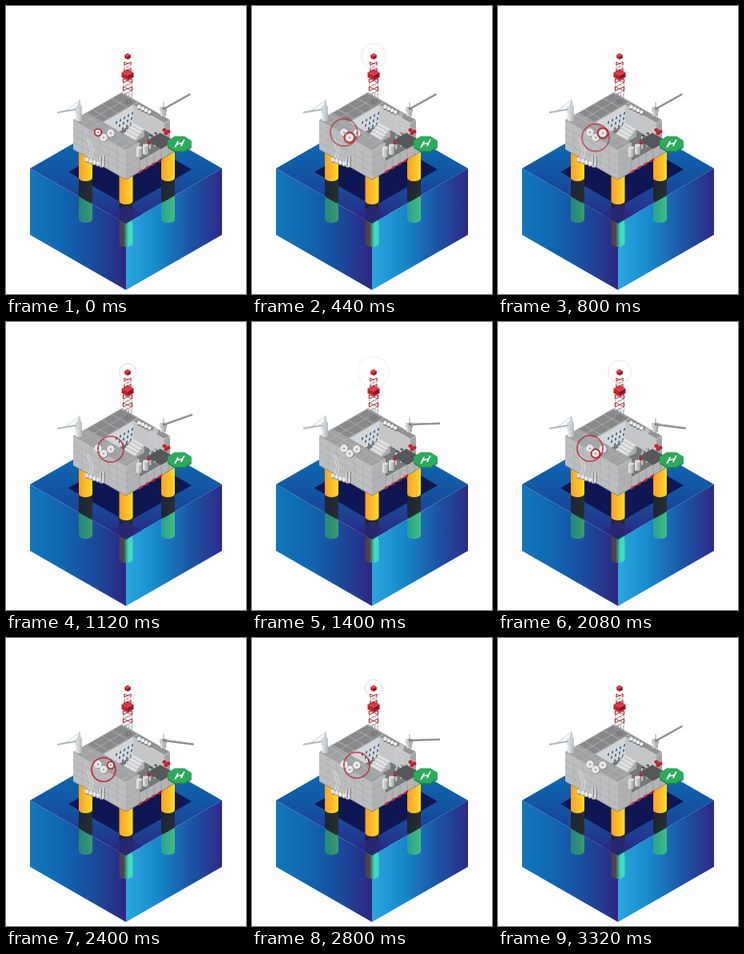
Animation, 300 px wide and 360 px high, one loop 3360 ms. Source, as an HTML page with a canvas:

```html
<!DOCTYPE html>
<html lang="en">
<head>
<meta charset="utf-8">
<title>Offshore platform</title>
<style>
html, body { margin: 0; width: 100%; height: 100%; overflow: hidden; background: #fff; }
canvas { display: block; width: 300px; height: 360px; }
</style>
</head>
<body>
<canvas id="stage" width="300" height="360"></canvas>
<script>
const stage = document.getElementById('stage');
const LOOP = 3360, HALF = LOOP / 2, BEAT = LOOP / 4;
const RED = '#c4202c', DARK_RED = '#8c1a22';
let c = stage.getContext('2d');

const clamp = v => Math.max(0, Math.min(1, v));
const ease = v => v * v * (3 - 2 * v);

// isometric point: a runs back to the right, b back to the left, z up
const iso = base => (a, b, z = 0) => [150 + a - b, base - (a + b) * .575 - z];
const water = iso(272);
const rig = iso(217);

function trace(points) {
  c.beginPath();
  points.forEach(p => c.lineTo(...p));
}
function face(fill, ...points) {
  trace(points);
  c.fillStyle = fill;
  c.fill();
}
function line(color, width, ...points) {
  trace(points);
  c.strokeStyle = color;
  c.lineWidth = width;
  c.stroke();
}
function oval(fill, x, y, rx, ry = rx) {
  c.beginPath();
  c.ellipse(x, y, rx, ry, 0, 0, 7);
  c.fillStyle = fill;
  c.fill();
}
function ring(color, x, y, r, width) {
  c.beginPath();
  c.arc(x, y, r, 0, 7);
  c.strokeStyle = color;
  c.lineWidth = width;
  c.stroke();
}
function grad(x0, y0, x1, y1, colors) {
  const g = c.createLinearGradient(x0, y0, x1, y1);
  colors.forEach((col, i) => g.addColorStop(i / (colors.length - 1), col));
  return g;
}
function tube(x, y, w, h, colors) {
  const r = w / 2, ry = w / 4;
  c.beginPath();
  c.moveTo(x, y);
  c.ellipse(x + r, y + h - ry, r, ry, 0, Math.PI, 0, true);
  c.lineTo(x + w, y);
  c.fillStyle = grad(x, 0, x + w, 0, colors);
  c.fill();
}

// a solid with three visible faces, seams every few units
function block(a0, a1, b0, b1, z0, z1, top, left, right) {
  face(top, rig(a0, b0, z1), rig(a1, b0, z1), rig(a1, b1, z1), rig(a0, b1, z1));
  face(left, rig(a0, b0, z0), rig(a0, b0, z1), rig(a0, b1, z1), rig(a0, b1, z0));
  face(right, rig(a0, b0, z0), rig(a0, b0, z1), rig(a1, b0, z1), rig(a1, b0, z0));
  line('#d6d7d9', .8, rig(a0, b1, z1), rig(a0, b0, z1), rig(a1, b0, z1));
}
function roofSeams(a0, a1, b0, b1, z) {
  for (let a = a0; a <= a1; a += 12) line('#b4b5b7', .8, rig(a, b0, z), rig(a, b1, z));
  for (let b = b1; b >= b0; b -= 10) line('#b4b5b7', .8, rig(a0, b, z), rig(a1, b, z));
}

const legs = [
  { x: 91, top: 176, foot: 219, deep: 271, sunk: ['#23867f', '#3a9b6c'] },
  { x: 194, top: 174, foot: 219, deep: 271, sunk: ['#2a9f92', '#3fc07c'] },
  { x: 141.5, top: 204, foot: 248, deep: 301, sunk: ['#46405a', '#514443', '#35dcc8', '#3be0b4'] }
];

function sea() {
  const front = water(0, 0), left = water(0, 120), right = water(120, 0), back = water(120, 120);
  const drop = ([x, y]) => [x, y + 83];
  const sides = [
    [left, front, drop(front), drop(left)],
    [front, right, drop(right), drop(front)]
  ];
  face(grad(0, 165, 0, 272, ['#0c6cb6', '#15509f', '#2a2784']), left, back, right, front);
  face(grad(30, 0, 150, 0, ['#1177bc', '#0f66b0', '#1a4b9c', '#2d2680']), ...sides[0]);
  face(grad(150, 0, 270, 0, ['#2aa8df', '#1787ca', '#1b56a6', '#2e2a86']), ...sides[1]);
  face('#0e1654', water(20, 18), water(100, 18), water(100, 92), water(20, 92));
  for (const leg of legs) tube(leg.x, leg.foot - 6, 17, 34, ['#1c2536', '#272d30']);
  face('rgba(42,39,132,.75)', front, water(0, 20), water(20, 20), water(20, 0));
  for (const side of sides) {
    c.save();
    trace(side);
    c.clip();
    for (const leg of legs) tube(leg.x, leg.foot, 17, leg.deep - leg.foot, leg.sunk);
    c.restore();
  }
  for (const leg of legs) {
    tube(leg.x, leg.top, 17, leg.foot - leg.top, ['#f8a21c', '#fdb22c', '#ffc42a', '#ffe010']);
  }
}

function hull() {
  block(0, 61, 0, 66, 0, 13, '#77787a', '#bcbdbf', '#b3b4b6');
  block(0, 61, 45, 66, 13, 36, '#88898b', '#bcbdbf', '#d3d6d9');
  roofSeams(0, 61, 45, 66, 36);
  for (let row = 0; row < 3; row++) {
    for (let a = 32 + row * 4; a < 54; a += 5) {
      face('#4c6f8c', rig(a, 45, 28 - row * 6), rig(a + 2, 45, 28 - row * 6),
        rig(a + 2, 45, 25 - row * 6), rig(a, 45, 25 - row * 6));
    }
  }
  block(54, 61, 6, 45, 13, 36, '#929395', '#c4c6c8', '#a3a4a6');
  for (let i = 0; i < 4; i++) {
    const a = 44 - i * 3;
    block(a, a + 3, 24, 38, 13, 22 - i * 2, '#e1e3e5', '#c5c7c9', '#a9abad');
  }
  block(0, 17, 0, 66, 0, 36, '#a1a2a4', '#bcbdbf', '#b0b1b3');
  roofSeams(0, 17, 0, 66, 36);
  for (let z = 9; z < 36; z += 9) line('#a3a4a6', .6, rig(0, 66, z), rig(0, 0, z), rig(17, 0, z));
  for (let b = 11; b < 66; b += 11) line('#a9aaac', .6, rig(0, b, 0), rig(0, b, 36));
  for (let a = 17; a < 61; a += 9) line('#8f9092', .6, rig(a, 0, 0), rig(a, 0, 13));
  line('#7b7c7e', .8, rig(0, 66), rig(0, 0), rig(61, 0));
  // ladders, flasks and pipes on the left side
  for (const side of [0, 3]) {
    line('#e6e7e8', .8, [101 + side, 166], [106 + side, 180], [103 + side, 193]);
  }
  for (let i = 0; i < 5; i++) {
    oval('#808183', 101.5 + i * 4.6, 192.7 + i * 1.6, 2.8, 3.2);
    oval('#e6e7e8', 101 + i * 4.6, 192 + i * 1.6, 2.3, 2.8);
  }
  for (let x = 117; x < 124; x += 4) tube(x, 187, 3, 14, ['#f2f2f2', '#77787a']);
}

function deckGear() {
  for (let i = 0; i < 4; i++) {
    oval('#707173', 167 + i * 4.3, 127 + i * 2.2, 2.9);
    oval('#eeeeef', 166.4 + i * 4.3, 126 + i * 2.2, 2.4);
  }
  for (let i = 0; i < 2; i++) {
    tube(163 + i * 8, 177 - i * 3, 7, 12, ['#ececed', '#9c9d9f']);
    oval('#dcdddf', 166.5 + i * 8, 177 - i * 3, 3.5, 1.8);
    tube(179 + i * 6, 162 - i * 3, 4, 17, ['#e6e7e8', '#5f6062']);
    oval('#4e4f51', 181 + i * 6, 162 - i * 3, 2, 1);
  }
  for (const [x, y] of [[198, 155], [203, 157], [200, 159], [179, 171]]) {
    oval(RED, x, y, 2.6, 2.2);
  }
  for (let a = 16; a < 44; a += 8) {
    face(RED, rig(a, 0, 1), rig(a + 5, 0, 1), rig(a + 5, 0, -2), rig(a, 0, -2));
  }
}

function helipad() {
  const x = 217, y = 172;
  const rim = shift => Array.from({ length: 8 }, (_, i) => {
    const turn = (i + .5) * Math.PI / 4;
    return [x + 16 * Math.cos(turn), y + shift + 10 * Math.sin(turn)];
  });
  face('#55575a', rig(44, 0, 13), rig(61, 0, 13), rig(61, 18, 13), rig(44, 18, 13));
  face('#1d7f44', ...rim(1.5));
  face('#2cab5b', ...rim(0));
  c.save();
  c.transform(.95, -.22, -.38, .8, x, y);
  for (const side of [-4, 4]) line('#fff', 2.2, [side, -5], [side, 5]);
  line('#fff', 2.2, [-4, 0], [4, 0]);
  c.restore();
}

function cube(x, y, r, h) {
  const d = r / 2;
  face('#dd3a42', [x - r, y], [x, y - d], [x + r, y], [x, y + d]);
  face(RED, [x - r, y], [x, y + d], [x, y + d + h], [x - r, y + h]);
  face(DARK_RED, [x + r, y], [x, y + d], [x, y + d + h], [x + r, y + h]);
}
function lattice(x, r, y0, y1, step) {
  for (let y = y0, i = 0; y < y1; y += step, i++) {
    const col = i % 2 ? '#c9cacc' : RED;
    line(col, .9, [x - r, y], [x + r, y + step]);
    line(i % 2 ? '#77787a' : DARK_RED, .9, [x + r, y], [x - r, y + step]);
    line(col, 1.3, [x - r, y], [x - r, y + step]);
    line(col, 1.3, [x + r, y], [x + r, y + step]);
  }
}
function tower() {
  face('#77787a', [145, 119], [152, 115], [159, 119], [152, 123]);
  lattice(152, 5.5, 91, 110, 5);
  for (let x = 147; x < 159; x += 3.3) line('#929395', .9, [x, 110], [x, 121]);
  cube(152, 83, 7.5, 6);
  lattice(152, 4, 70, 81, 4);
  oval('#e4e5e6', 150, 78, 1.8);
  oval('#e4e5e6', 154, 74, 1.8);
  cube(152, 61, 3.8, 4);
}

function leftCrane() {
  tube(87, 133, 8, 11, ['#eef0f1', '#aeb4b8']);
  tube(86, 125, 9, 10, ['#dfe4e7', '#b9c2c7']);
  face('#c5ced3', [89, 125], [92, 116], [94, 125]);
  line('#9aa4aa', 1.8, [64, 133], [88, 129]);
  line('#e0e4e6', .8, [64, 132.5], [88, 128.3]);
  line('#aab2b7', .6, [92, 118], [74, 131]);
}

function rightCrane(t) {
  const down = ease(clamp((t - BEAT) / BEAT)) * (1 - ease(clamp((t - 3 * BEAT) / BEAT)));
  tube(193, 130, 7, 8, ['#e3e4e5', '#9b9c9e']);
  tube(192, 126, 9, 7, ['#d4d6d8', '#a3a5a7']);
  line('#828385', .8, [197, 120], [197, 128]);
  c.save();
  c.translate(198, 128);
  c.rotate(-.51 + down * .64);
  line('#737476', 2.4, [-2, 0], [37, 0]);
  line('#c5c6c8', .8, [0, -.5], [37, -.5]);
  c.restore();
}

function smoke(t) {
  const p = (t % BEAT - 80) / 460;
  if (p <= 0 || p >= 1) return;
  const show = Math.sin(Math.PI * p);
  for (let pipe = 0; pipe < 2; pipe++) {
    for (let i = 0; i < 6; i++) {
      const rise = i * 4.6 * Math.min(1, p * 2.2);
      const sway = Math.sin(i * 1.3 + pipe * 6) * (.5 + i * .3);
      oval(`rgba(200,202,204,${.85 * show})`, 181 + pipe * 6 + sway, 161 - pipe * 3 - rise,
        1.4 + i * .4 * show, 2.6 + i * .3);
    }
  }
}

const dishes = [[115, 158], [122, 164.5], [131, 159]];

function dish([x, y]) {
  oval('#77787a', x + .6, y + .6, 4.9);
  oval('#f3f3f4', x, y, 4.7);
  ring('#cfd0d2', x, y, 3, .7);
  oval('#97989a', x, y, 1.3);
}

function signals(t) {
  dishes.forEach(([x, y], i) => {
    const age = t % HALF - i * 360;
    if (age < 0 || age > 620) return;
    const fade = 1 - clamp((age - 340) / 300);
    ring(`rgba(190,28,40,${.9 * fade})`, x, y, 4.3 + 12.7 * clamp(age / 430), 1.8);
  });
  const age = (t - 40 + BEAT) % BEAT;
  if (age < 650) ring(`rgba(195,196,199,${1 - age / 740})`, 152, 62.5, 3 + age * .0315, .9);
}

function still(paint) {
  const layer = document.createElement('canvas');
  layer.width = 300;
  layer.height = 360;
  c = layer.getContext('2d');
  paint();
  c = stage.getContext('2d');
  return layer;
}

const scene = still(() => {
  c.fillStyle = '#fff';
  c.fillRect(0, 0, 300, 360);
  sea();
  hull();
  deckGear();
  helipad();
  tower();
  leftCrane();
  dishes.forEach(dish);
});

const start = performance.now();
function draw(now) {
  const t = Math.floor(Math.max(0, now - start) % LOOP / 40) * 40;
  c.drawImage(scene, 0, 0);
  rightCrane(t);
  smoke(t);
  signals(t);
  requestAnimationFrame(draw);
}
draw(start);
</script>
</body>
</html>
```
